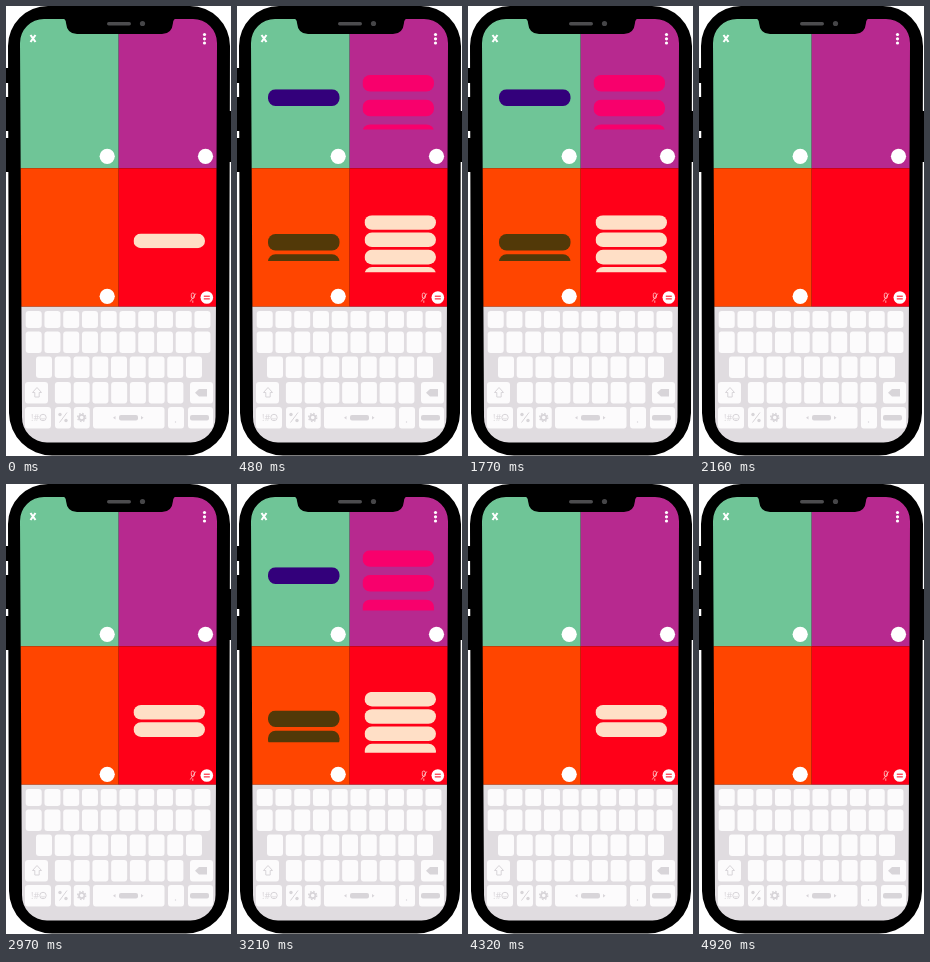
An HTML page for the animation above (8970 ms loop, 225 px wide and 450 px high).

```html
<!DOCTYPE html>
<html lang="en">
<head>
<meta charset="utf-8">
<title>Four-way live typing</title>
<style>
  html, body { margin: 0; width: 100%; height: 100%; overflow: hidden; background: #fff; }
  svg { display: block; width: 225px; height: 450px; }
  text { font-family: "Open Sans", Arial, sans-serif; }
  .key { fill: #fcfbfc; }
  .glyph { fill: #d8d5d9; }
  .line { fill: none; stroke: #d8d5d9; }
</style>
</head>
<body>
<svg id="stage" viewBox="0 0 225 450">
  <defs>
    <clipPath id="screen">
      <path d="M38 13H187A24 24 0 0 1 211 37L209.500 411A25 25 0 0 1 184.500 436.500H41A25 25 0 0 1 16 411L14 37A24 24 0 0 1 38 13z"/>
    </clipPath>
  </defs>

  <!-- phone body -->
  <path d="M42 0H184A40 40 0 0 1 224 40L223 407A43 43 0 0 1 180 449.500H46A43 43 0 0 1 3 407L2 40A40 40 0 0 1 42 0z"/>
  <path d="M0 62h3v15H0zM0 91h3v34H0zM0 132h3v34H0zM222 105h3v51h-3z"/>

  <g clip-path="url(#screen)">
    <path fill="#6fc597" d="M14 13h98.700v149.300H14z"/>
    <path fill="#b7298f" d="M112.700 13H211v149.300h-98.300z"/>
    <path fill="#ff4500" d="M14 162.300h98.700v138.400H14z"/>
    <path fill="#ff0018" d="M112.700 162.300H211v138.400h-98.300z"/>
    <path fill="#e0dce0" d="M14 300.700h197V437H14z"/>
    <g id="keys" class="key"></g>
  </g>

  <!-- notch -->
  <path d="M56 12h115q-4 1-4 5-1 11-11 11H71Q61 28 60 17q0-4-4-5z"/>
  <rect x="101" y="16" width="24" height="3.500" rx="1.700" fill="#4c4c4e"/>
  <circle cx="136.500" cy="17.500" r="2.600" fill="#464648"/>

  <!-- screen controls -->
  <path d="M24.500 29l5 7M29.500 29l-5 7" stroke="#fff" stroke-width="2.100"/>
  <g fill="#fff">
    <circle cx="198.500" cy="28.500" r="1.600"/>
    <circle cx="198.500" cy="32.800" r="1.600"/>
    <circle cx="198.500" cy="37" r="1.600"/>
    <circle cx="101.200" cy="150.300" r="7.600"/>
    <circle cx="199.500" cy="150.300" r="7.600"/>
    <circle cx="101.200" cy="290.300" r="7.600"/>
    <circle cx="200.800" cy="291.500" r="6.300"/>
  </g>
  <path d="M197.800 290.200h6M197.800 292.900h6" stroke="#ff0018"/>
  <g fill="none" stroke="#ffd0d0" stroke-width=".8">
    <rect x="185.300" y="287" width="3" height="5.500" rx="1.500"/>
    <path d="M186.800 294.500v2.300M189.800 287.500l-5.500 8"/>
  </g>

  <!-- keyboard glyphs -->
  <path class="line" d="M31 381.500l4.500 5h-2.300v4.500h-4.400v-4.500h-2.300z"/>
  <g class="glyph">
    <path d="M189 386.800l4-3.800h8v7.600h-8z"/>
    <text x="25" y="415" font-size="9">!#</text>
    <circle class="line" cx="37" cy="411.500" r="3.200"/>
    <path class="line" stroke-width=".8" d="M35.300 412.300q1.700 1.700 3.400 0"/>
    <path class="line" d="M61 406.500l-7.500 10"/>
    <circle cx="54" cy="408.500" r="1.700"/>
    <circle cx="60" cy="414.500" r="1.700"/>
    <circle class="line" cx="75.700" cy="411.500" r="2.700" stroke-width="1.800"/>
    <circle class="line" cx="75.700" cy="411.500" r="4" stroke-width="1.400" stroke-dasharray="1.570 1.570"/>
    <rect x="113" y="409" width="19" height="5.500" rx="2"/>
    <path d="M109.500 410v3.500l-2.500-1.750zM135 410v3.500l2.500-1.750z"/>
    <circle cx="169.500" cy="416" r=".7"/>
    <rect x="184" y="409" width="19" height="5.500" rx="2"/>
  </g>

  <g id="pills"></g>
</svg>

<script>
const NS = "http://www.w3.org/2000/svg";
const LOOP = 8970, STEP = 30, TYPE_AT = 180, CLEAR_AT = 870, LAST = 14;
const STARTS = [0, 1290, 2700, 4050];

function add(parent, tag, attrs) {
  const el = document.createElementNS(NS, tag);
  for (const name in attrs) el.setAttribute(name, attrs[name]);
  return parent.appendChild(el);
}

// Keyboard
const PITCH = 18.75;
const keys = document.getElementById("keys");
const key = (x, y, width, height = 21.5) => add(keys, "rect", { x, y, width, height, rx: 3 });
function row(x, y, count, height) {
  for (let i = 0; i < count; i++) key(x + i * PITCH, y, 16, height);
}
row(19.7, 305, 10, 17);
row(19.7, 325.5, 10);
row(30, 350.5, 9);
row(48.9, 376, 7);
key(19, 376, 23);
key(184, 376, 23);
row(49, 401, 2);
key(19, 401, 26);
key(87, 401, 71.5);
key(162, 401, 16);
key(182, 401, 25);

// Message blocks: `top` and `shown` height as [step, value] points
const blocks = [
  { x: 127.5, h: 14.6, pitch: 17.3, lines: 4, fill: "#ffdfc6", from: -1,
    top: [[-1, 227.6], [3, 221], [10, 209.2], [14, 204]],
    shown: [[-1, 14.6], [3, 31.9], [10, 57], [12.5, 66.5]] },
  { x: 125.5, h: 16.5, pitch: 24.7, lines: 3, fill: "#f8006c", from: 4,
    top: [[4, 83], [10, 69], [14, 58]],
    shown: [[4, 16.5], [10, 54.5], [12, 65.9]] },
  { x: 31, h: 16.5, pitch: 20.2, lines: 2, fill: "#523908", from: 6,
    top: [[10, 228], [14, 222]],
    shown: [[8, 16.5], [10, 27], [12, 36.7]] },
  { x: 31, h: 16.8, pitch: 25, lines: 1, fill: "#33007b", from: 8,
    top: [[8, 83.2]],
    shown: [[8, 16.8]] }
];

const pills = document.getElementById("pills");
blocks.forEach((b, i) => {
  const clip = add(pills, "clipPath", { id: "reveal" + i });
  b.mask = add(clip, "rect", { x: b.x, y: 0, width: 72, height: 0 });
  b.node = add(pills, "g", { fill: b.fill, "clip-path": `url(#reveal${i})` });
  for (let n = 0; n < b.lines; n++) {
    add(b.node, "rect", { x: b.x, y: n * b.pitch, width: 71.5, height: b.h, rx: 7.5 });
  }
});

function along(points, k) {
  if (k <= points[0][0]) return points[0][1];
  for (let i = 1; i < points.length; i++) {
    const [k0, v0] = points[i - 1], [k1, v1] = points[i];
    if (k <= k1) return v0 + (v1 - v0) * (k - k0) / (k1 - k0);
  }
  return points[points.length - 1][1];
}

function render(t) {
  const local = t - STARTS.filter(s => s <= t).pop();
  const k = Math.max(-1, Math.min(LAST, Math.floor((local - TYPE_AT) / STEP)));
  for (const b of blocks) {
    const visible = local < CLEAR_AT && k >= b.from;
    b.node.style.display = visible ? "" : "none";
    if (!visible) continue;
    b.node.setAttribute("transform", `translate(0 ${along(b.top, k)})`);
    b.mask.setAttribute("height", along(b.shown, k));
  }
}

const began = performance.now();
function tick() {
  render((performance.now() - began) % LOOP);
  requestAnimationFrame(tick);
}
tick();
</script>
</body>
</html>
```
